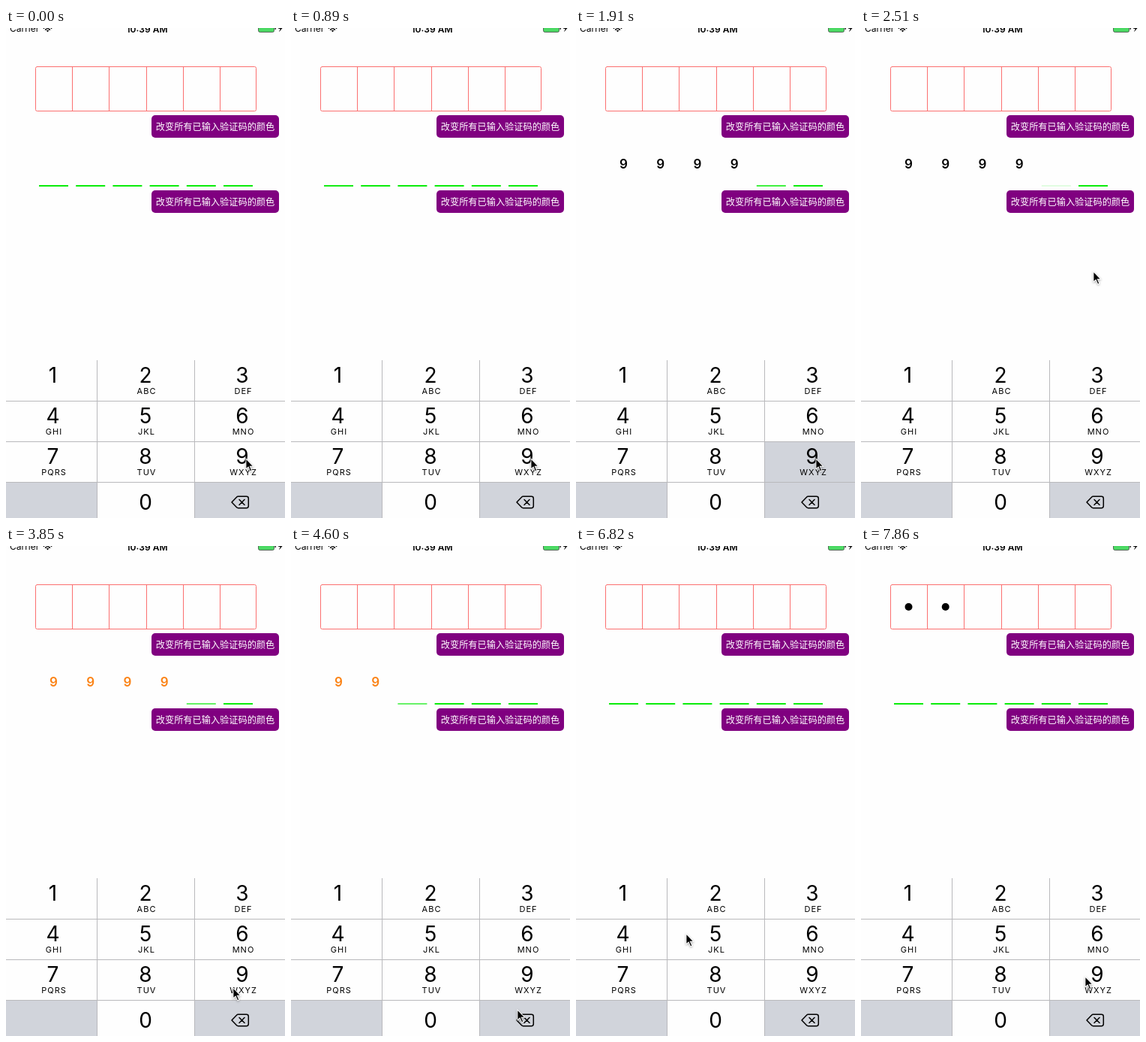
Recreate the animation shown at these times as an HTML page with a canvas. Size 372 by 652 pixels, loop 8 s.

```html
<!DOCTYPE html>
<html lang="zh">
<head>
<meta charset="utf-8">
<title>Code input</title>
<style>
html, body { margin: 0; width: 100%; height: 100%; overflow: hidden; background: #fefefe; }
canvas { display: block; }
</style>
</head>
<body>
<canvas id="stage" width="372" height="652"></canvas>
<script>
const ctx = document.getElementById('stage').getContext('2d');
const LOOP = 8000, START = 275, STEP = 148.7;
const SANS = 'Inter, "Liberation Sans", sans-serif';
const CJK = '"Noto Sans CJK SC", "Noto Sans CJK", sans-serif';
const GREY = '#d1d4db', PITCH = 49.2;

// Each entry: step, then value(s) from that step on.
const POINTER = [
  [-1, 320, 573], [11, 320, 573], [13, 316, 450], [15, 310, 324], [17, 304, 236],
  [20, 304, 234], [22, 307, 470], [23, 308, 550], [24, 303, 588], [25, 302, 617],
  [33, 302, 617], [36, 262, 330], [39, 225, 93], [41, 225, 93], [44, 147, 516],
  [45, 147, 516], [47, 299, 573]
];
const DIGITS = [[-1, 0], [6, 1], [8, 2], [10, 3], [11, 4], [26, 3], [28, 2], [30, 1], [32, 0]];
const DOTS = [[-1, 0], [49, 1], [50, 2]];
const NINE_DOWN = [6, 8, 10, 11, 49, 50];
const DELETE_DOWN = [26, 28, 30, 32];
const ORANGE_STEP = 19, BLUR_STEP = 39;

const KEYS = [
  ['1', ''], ['2', 'ABC'], ['3', 'DEF'],
  ['4', 'GHI'], ['5', 'JKL'], ['6', 'MNO'],
  ['7', 'PQRS'], ['8', 'TUV'], ['9', 'WXYZ']
];

function rect(x, y, w, h, color) {
  ctx.fillStyle = color;
  ctx.fillRect(x, y, w, h);
}

function text(str, x, y, font, color = '#000', align = 'center', spacing = 0) {
  ctx.font = font;
  ctx.fillStyle = color;
  ctx.textAlign = align;
  ctx.letterSpacing = spacing + 'px';
  ctx.fillText(str, x + spacing / 2, y);
  ctx.letterSpacing = '0px';
}

function path(points) {
  ctx.beginPath();
  points.forEach(([x, y]) => ctx.lineTo(x, y));
  ctx.closePath();
}

function roundRect(x, y, w, h, r) {
  ctx.beginPath();
  ctx.roundRect(x, y, w, h, r);
}

const latest = (track, k) => track.filter(e => e[0] <= k).pop();

function pointerAt(k) {
  const i = POINTER.findIndex(p => p[0] > k);
  if (i < 0) return POINTER[POINTER.length - 1].slice(1);
  const a = POINTER[i - 1], b = POINTER[i];
  const f = (k - a[0]) / (b[0] - a[0]);
  return [a[1] + (b[1] - a[1]) * f, a[2] + (b[2] - a[2]) * f];
}

function statusBar() {
  text('Carrier', 5, 5, '12px ' + SANS, '#000', 'left');
  text('10:39 AM', 188, 5.5, '600 12px ' + SANS);
  ctx.lineWidth = 1.6;
  ctx.strokeStyle = '#000';
  for (const r of [4, 7]) {
    ctx.beginPath();
    ctx.arc(55.5, 5, r, -Math.PI * 0.76, -Math.PI * 0.24);
    ctx.stroke();
  }
  path([[55.5, 5.5], [53.6, 3], [57.4, 3]]);
  ctx.fillStyle = '#000';
  ctx.fill();
  roundRect(336.5, -5, 21, 10.5, 2);
  ctx.fillStyle = '#4cd964';
  ctx.fill();
  ctx.lineWidth = 0.7;
  ctx.strokeStyle = '#333';
  ctx.stroke();
  rect(358.5, -2, 1.5, 4, '#333');
  path([[366, -5], [363, 1], [365.6, 1], [364, 5.5], [369, -0.5], [366.3, -0.5]]);
  ctx.fillStyle = '#111';
  ctx.fill();
}

function boxField(count) {
  ctx.lineWidth = 1;
  ctx.strokeStyle = '#fb7070';
  roundRect(39.5, 51.5, 294, 59, 2);
  ctx.stroke();
  ctx.beginPath();
  for (let i = 1; i < 6; i++) {
    const x = Math.floor(39.5 + PITCH * i) + 0.5 - (i > 1 && i < 4 ? 0 : 0);
    ctx.moveTo(x, 52);
    ctx.lineTo(x, 110);
  }
  ctx.stroke();
  ctx.fillStyle = '#000';
  for (let i = 0; i < count; i++) {
    ctx.beginPath();
    ctx.arc(63.5 + PITCH * i, 81, 5, 0, 7);
    ctx.fill();
  }
}

function lineField(k) {
  const [since, count] = latest(DIGITS, k);
  const color = k >= ORANGE_STEP ? '#fb8316' : '#000';
  for (let i = 0; i < 6; i++) {
    if (i < count) {
      text('9', 63.5 + PITCH * i, 187, '600 17px ' + SANS, color);
      continue;
    }
    if (i === count && k >= 0 && k < BLUR_STEP) {
      const age = (k - since) * STEP + 200;
      ctx.globalAlpha = 1 - (age % 900) / 900;
    }
    rect(44 + PITCH * i, 209, 39, 2, '#0bec0b');
    ctx.globalAlpha = 1;
  }
}

function button(y) {
  roundRect(194, y, 170, 30, 5);
  ctx.fillStyle = '#800080';
  ctx.fill();
  text('改变所有已输入验证码的颜色', 279, y + 19.8, '12.2px ' + CJK, '#fff');
}

function deleteIcon() {
  ctx.strokeStyle = '#000';
  ctx.lineWidth = 1.5;
  ctx.lineJoin = ctx.lineCap = 'round';
  ctx.beginPath();
  ctx.moveTo(301, 631);
  ctx.lineTo(307.5, 624.2);
  ctx.quadraticCurveTo(308.3, 623.3, 309.5, 623.3);
  ctx.lineTo(320.5, 623.3);
  ctx.quadraticCurveTo(323.3, 623.3, 323.3, 626);
  ctx.lineTo(323.3, 636);
  ctx.quadraticCurveTo(323.3, 638.7, 320.5, 638.7);
  ctx.lineTo(309.5, 638.7);
  ctx.quadraticCurveTo(308.3, 638.7, 307.5, 637.8);
  ctx.closePath();
  ctx.moveTo(311, 627.5);
  ctx.lineTo(318, 634.5);
  ctx.moveTo(318, 627.5);
  ctx.lineTo(311, 634.5);
  ctx.stroke();
}

function keypad(k) {
  rect(0, 604, 122, 48, GREY);
  if (!DELETE_DOWN.includes(k)) rect(251, 604, 121, 48, GREY);
  if (NINE_DOWN.includes(k)) rect(251, 550, 121, 54, GREY);
  for (const y of [496, 550, 604]) rect(0, y, 372, 1, '#b9b9bc');
  for (const x of [121, 251]) rect(x, 442, 1, 210, '#b9b9bc');
  const xs = [62.5, 186, 315];
  KEYS.forEach(([digit, letters], i) => {
    const x = xs[i % 3], y = 472 + 54 * Math.floor(i / 3);
    text(digit, x, y, '28px ' + SANS);
    text(letters, x + 1, y + 15, '11px ' + SANS, '#000', 'center', 1);
  });
  text('0', 186, 641, '28px ' + SANS);
  deleteIcon();
}

function pointer([x, y]) {
  ctx.save();
  ctx.translate(x, y);
  path([[-0.5, -1], [-0.5, 15], [3, 11.8], [5.6, 17.6], [8.4, 16.4], [5.9, 10.8], [10.8, 10.8]]);
  ctx.shadowColor = 'rgba(0,0,0,0.35)';
  ctx.shadowBlur = 3;
  ctx.shadowOffsetY = 1;
  ctx.fillStyle = '#fff';
  ctx.fill();
  ctx.shadowColor = 'transparent';
  path([[0.4, 1.2], [0.4, 12.8], [3.3, 10.2], [6, 16.2], [7.2, 15.7], [4.6, 9.8], [8.6, 9.8]]);
  ctx.fillStyle = '#000';
  ctx.fill();
  ctx.restore();
}

function draw() {
  const t = performance.now() % LOOP;
  const k = Math.max(-1, Math.floor((t - START) / STEP));
  rect(0, 0, 372, 652, '#fefefe');
  statusBar();
  boxField(latest(DOTS, k)[1]);
  lineField(k);
  button(116);
  button(216);
  keypad(k);
  pointer(pointerAt(k));
  requestAnimationFrame(draw);
}
draw();
</script>
</body>
</html>
```
